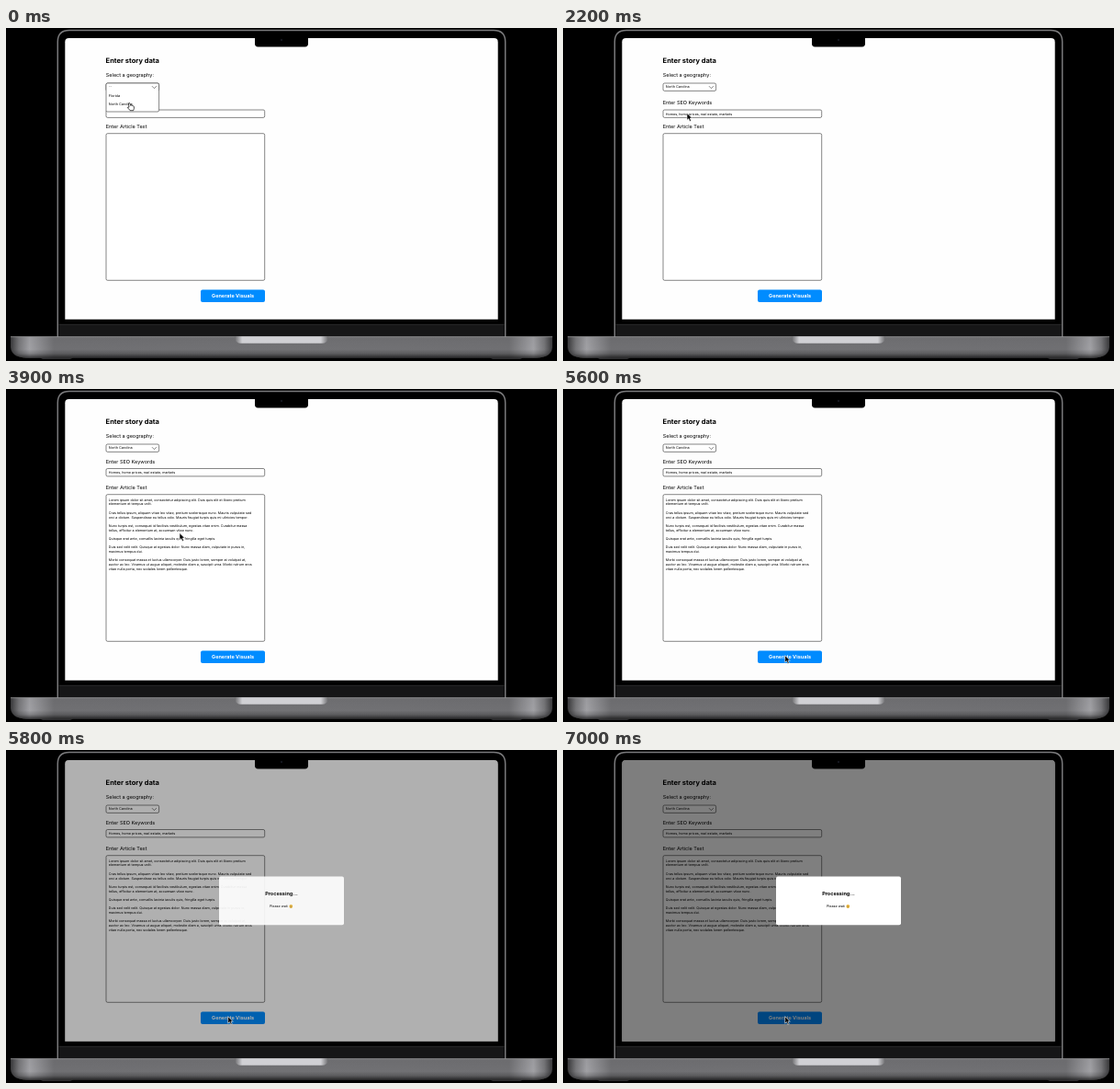
An HTML page for the animation above (8000 ms loop, 600 px wide and 362 px high).

```html
<!DOCTYPE html>
<html lang="en">
<head>
<meta charset="utf-8">
<title>Story data form</title>
<style>
  html, body { margin: 0; width: 100%; height: 100%; overflow: hidden; background: #000; }
  svg { display: block; width: 100%; height: 100%; }
  text { font-family: Inter, sans-serif; font-size: 5.53px; text-rendering: geometricPrecision; }
  .bold { font-weight: 700; }
  .small { font-size: 3.7px; }
  .option { font-size: 3.8px; }
  .box { fill: #fff; stroke: #222; stroke-width: .55; }
  .line { fill: none; stroke: #222; stroke-width: .55; }
</style>
</head>
<body>
<svg viewBox="0 0 600 362">
  <defs>
    <linearGradient id="metal">
      <stop offset="0" stop-color="#3a3a3c"/>
      <stop offset=".015" stop-color="#78787b"/>
      <stop offset=".035" stop-color="#a4a4a8"/>
      <stop offset=".08" stop-color="#727275"/>
      <stop offset=".5" stop-color="#747477"/>
      <stop offset=".92" stop-color="#727275"/>
      <stop offset=".965" stop-color="#a4a4a8"/>
      <stop offset=".985" stop-color="#78787b"/>
      <stop offset="1" stop-color="#3a3a3c"/>
    </linearGradient>
    <linearGradient id="shade" x2="0" y2="1">
      <stop offset="0" stop-color="#000" stop-opacity=".06"/>
      <stop offset=".6" stop-color="#000" stop-opacity=".02"/>
      <stop offset=".8" stop-color="#000" stop-opacity=".2"/>
      <stop offset="1" stop-color="#000" stop-opacity=".65"/>
    </linearGradient>
    <linearGradient id="lip">
      <stop offset="0" stop-color="#6a6a6c"/>
      <stop offset=".08" stop-color="#d0d0d4"/>
      <stop offset=".92" stop-color="#d0d0d4"/>
      <stop offset="1" stop-color="#6a6a6c"/>
    </linearGradient>
    <path id="base" d="M5 335.5H595V347Q594 358 578 358.5H22Q6 358 5 347Z"/>
    <path id="screen" d="M64.3 316.8V15.2Q64.3 11 68.5 11H531.5Q535.7 11 535.7 15.2V316.8Z"/>
  </defs>

  <!-- Laptop -->
  <path d="M56.3 336V15Q56.3 2.5 69 2.5H531Q543.7 2.5 543.7 15V336" fill="#000" stroke="#7a7a7c" stroke-width="1.5"/>
  <rect x="57.5" y="322" width="485" height="13.5" fill="#161617"/>
  <path d="M57.5 322.3H542.5" stroke="#303031" stroke-width=".7"/>
  <path d="M37 358.5H73L70 360H40ZM527 358.5H563L560 360H530Z" fill="#2c2c2e"/>
  <use href="#base" fill="url(#metal)"/>
  <use href="#base" fill="url(#shade)"/>
  <path d="M5 335.7H595" stroke="#a0a0a2" stroke-width=".7"/>
  <path d="M249 335.3H351V337Q350 342.8 344 342.8H256Q250 342.8 249 337Z" fill="url(#lip)"/>

  <!-- Form -->
  <use href="#screen" fill="#fefefe"/>
  <text class="bold" x="108.6" y="37.5" style="font-size:7.5px">Enter story data</text>
  <text x="108.8" y="53.4">Select a geography:</text>
  <g id="keywordField">
    <text x="108.8" y="83.2">Enter SEO Keywords</text>
    <rect class="box" x="109" y="89" width="172.7" height="8.4" rx="1.6"/>
    <text id="keywords" class="small" x="111.8" y="94.5">Homes, home prices, real estate, markets</text>
  </g>
  <text x="108.8" y="109">Enter Article Text</text>
  <rect class="box" x="109" y="114.7" width="172.7" height="159.6" rx="1.6"/>
  <g id="article"></g>
  <rect x="212" y="284.4" width="70" height="13.6" rx="2" fill="#008cff"/>
  <text class="bold" x="247" y="293.2" fill="#fff" text-anchor="middle">Generate Visuals</text>

  <rect class="box" x="109" y="60" width="57.6" height="8.4" rx="1.6"/>
  <text class="option" x="111.8" y="65.3">North Carolina</text>
  <g id="menu">
    <rect class="box" x="109" y="60" width="57.6" height="31" rx="1.6"/>
    <text class="option" x="111.8" y="65.3" fill="#555">--</text>
    <text class="option" x="111.8" y="74.6">Florida</text>
    <text class="option" x="111.8" y="84.3">North Carolina</text>
  </g>
  <path class="line" d="M159 63.2L161.4 65.6L163.8 63.2"/>

  <!-- Processing dialog -->
  <use id="dim" href="#screen"/>
  <g id="dialog">
    <rect x="232" y="137.4" width="136" height="52.8" rx="2" fill="#fff"/>
    <text class="bold" x="300" y="158.4" text-anchor="middle">Processing...</text>
    <text class="small" x="287" y="171.4">Please wait</text>
    <circle cx="310.3" cy="170" r="1.9" fill="#f3c044"/>
    <path d="M309.2 169.4h.7M310.8 169.4h.7M309.4 170.8h1.8" stroke="#6b4a1c" stroke-width=".5"/>
  </g>

  <!-- Camera notch -->
  <path d="M271 10.5H329V17Q329 20.4 325.6 20.4H274.4Q271 20.4 271 17Z"/>
  <circle cx="300" cy="13" r="1.2" fill="#15171f"/>

  <!-- Pointers, with the tip at the origin -->
  <g stroke-linejoin="round">
    <path id="arrow" d="M0 0V7.6L1.8 6L3 8.8L4.5 8.1L3.3 5.4H5.6Z" stroke="#fff" stroke-width=".6"/>
    <path id="hand" d="M-.8 .6Q0 -.5 .8 .6L1.4 3Q2.3 2.3 2.8 3.1Q3.7 2.6 4.1 3.5Q5 3.3 5.2 4.3Q5.5 6.5 4.5 8.4H.9Q-.3 6.4 -2 5.3Q-1.8 4.2 -.2 4.9Z"
      fill="#fff" stroke="#000" stroke-width=".7"/>
  </g>
</svg>
<script>
const LOOP = 8000, STEP = 100;
const el = id => document.getElementById(id);

// An empty string is a paragraph gap.
const article = [
  'Lorem ipsum dolor sit amet, consectetur adipiscing elit. Duis quis elit et libero pretium',
  'elementum et tempus velit.', '',
  'Cras tellus ipsum, aliquam vitae leo vitae, pretium scelerisque nunc. Mauris vulputate sed',
  'orci a dictum. Suspendisse eu tellus odio. Mauris feugiat turpis quis mi ultricies tempor.', '',
  'Nunc turpis est, consequat id facilisis vestibulum, egestas vitae enim. Curabitur massa',
  'tellus, efficitur a elementum at, accumsan vitae nunc.', '',
  'Quisque erat ante, convallis lacinia iaculis quis, fringilla eget turpis.', '',
  'Duis sed velit velit. Quisque at egestas dolor. Nunc massa diam, vulputate in purus in,',
  'maximus tempus dui.', '',
  'Morbi consequat massa et luctus ullamcorper. Duis justo lorem, semper at volutpat at,',
  'auctor ac leo. Vivamus ut augue aliquet, molestie diam a, suscipit urna. Morbi rutrum eros',
  'vitae nulla porta, nec sodales lorem pellentesque.'
];
el('article').innerHTML = article.map((line, i) =>
  `<text class="small" x="111.8" y="${121.8 + i * 4.69}">${line}</text>`).join('');

const moves = [
  { from: 500, to: 1600, x: 135, y: 92.6 },
  { from: 2400, to: 3100, x: 189, y: 156.6 },
  { from: 4100, to: 4500, x: 247, y: 269.4 },
  { from: 4600, to: 5300, x: 241.7, y: 289.6 }
];

function ease(time, from, to) {
  const p = Math.min(1, Math.max(0, (time - from) / (to - from)));
  return p * p * (3 - 2 * p);
}

function pointerAt(time) {
  let x = 134.2, y = 81.3;
  for (const move of moves) {
    const p = ease(time, move.from, move.to);
    x += (move.x - x) * p;
    y += (move.y - y) * p;
  }
  return `translate(${x} ${y})`;
}

const setOpacity = (id, value) => el(id).setAttribute('opacity', value);

function render(now) {
  const time = Math.floor(now % LOOP / STEP) * STEP;
  const filled = time >= 3900;
  const clicked = time >= 600;
  const dim = ease(time, 5585, 5955);

  setOpacity('menu', 1 - ease(time, 500, 800));
  setOpacity('keywords', ease(time, 1900, 2200));
  setOpacity('article', +filled);
  el('keywordField').setAttribute('transform', `translate(0 ${filled ? -2.5 : 0})`);
  setOpacity('dim', dim / 2);
  setOpacity('dialog', dim ** .2 * (time >= 5700));

  setOpacity('hand', +!clicked);
  setOpacity('arrow', +clicked);
  for (const id of ['hand', 'arrow']) el(id).setAttribute('transform', pointerAt(time));
}

const start = performance.now();
function tick() {
  render(performance.now() - start);
  requestAnimationFrame(tick);
}
tick();
</script>
</body>
</html>
```
